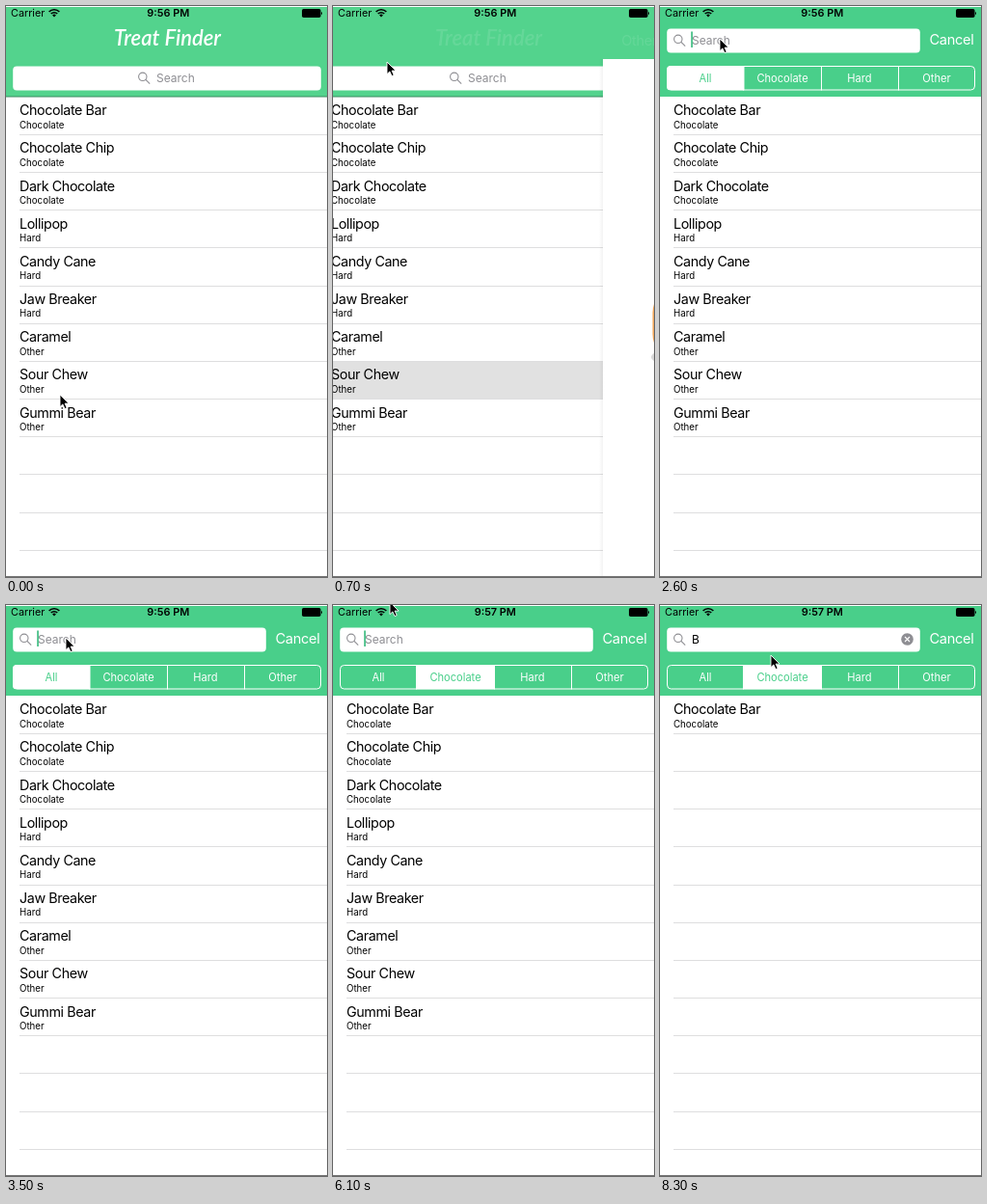
These frames come from a looping animation (333x592 px, 8.4 s). An HTML page:

```html
<!DOCTYPE html>
<html lang="en">
<head>
<meta charset="utf-8">
<title>Treat Finder</title>
<style>
html, body { margin: 0; width: 100%; height: 100%; overflow: hidden; background: #fff; }
svg { display: block; width: 333px; height: 592px; font-family: Inter, Roboto, sans-serif; }
.name { font-size: 14.3px; letter-spacing: -0.4px; }
.kind { font-size: 9.7px; }
.field { font-size: 12px; }
.scope { font-size: 11.1px; text-anchor: middle; }
.bar { font-size: 14.6px; letter-spacing: -0.3px; fill: #fff; }
.logo { font: italic 600 22px Lato, sans-serif; text-anchor: middle; fill: #fff; }
</style>
</head>
<body>
<svg viewBox="0 0 333 592">
  <defs>
    <linearGradient id="edge">
      <stop offset="0" stop-opacity="0"/>
      <stop offset="1" stop-opacity=".05"/>
    </linearGradient>
    <clipPath id="segClip"><rect x="7" y="62" width="320" height="25.5" rx="4"/></clipPath>
  </defs>
  <rect width="333" height="592" fill="#fff"/>
  <rect id="nav" width="333" height="56"/>
  <text id="home" class="logo" x="167.5" y="41">Treat Finder</text>
  <text id="kindTitle" class="bar" y="40.5" text-anchor="middle">Other</text>
  <g id="back">
    <path d="M15 28l-7 7.500 7 7.500" fill="none" stroke="#fff" stroke-width="2"/>
    <text class="bar" x="20" y="40.500">Back</text>
  </g>

  <g id="list">
    <rect y="94" width="333" height="498" fill="#fff"/>
    <rect id="glow" y="368" width="333" height="40" fill="#d9d9d9"/>
    <g id="lines" fill="#dededf"></g>
    <g id="rows"></g>
    <rect id="head" y="55" width="333" height="39"/>
    <rect id="rule" y="93.500" width="333" height="1" fill="#3c8a64"/>
    <g id="scopes"></g>
    <text id="cancel" class="bar" x="279.500" y="40.300">Cancel</text>
    <g id="search">
      <rect id="box" x="7.200" y="62.400" height="25.200" rx="4" fill="#fff"/>
      <g id="lens" fill="none" stroke="#8e8e93" stroke-width="1.100">
        <circle cx="4.800" cy="73.300" r="4.200"/>
        <path d="M7.900 76.400l4.300 4.300"/>
      </g>
      <text id="hint" class="field" y="79" fill="#8e8e93">Search</text>
      <text id="typed" class="field" x="33" y="79"></text>
      <rect id="caret" y="65.500" width="1.700" height="16.500" fill="#3fbd82"/>
      <g id="clear">
        <circle cx="256.500" cy="74.500" r="6.300" fill="#8e8e93"/>
        <path d="M254 72l5 5m0-5l-5 5" stroke="#fff" stroke-width="1.100"/>
      </g>
    </g>
  </g>

  <g id="detail">
    <rect x="-4" y="55" width="4" height="537" fill="url(#edge)"/>
    <rect y="55" width="333" height="537" fill="#fff"/>
    <text class="name" x="166.500" y="100" text-anchor="middle">Sour Chew</text>
    <ellipse cx="167" cy="364" rx="117" ry="18" fill="#d9d9d9"/>
    <rect x="177" y="284" width="100" height="80" rx="26" fill="#f3c63c"/>
    <rect x="51.500" y="290" width="112" height="78" rx="28" fill="#f6ab5e"/>
    <rect x="113" y="304" width="100" height="76" rx="26" fill="#f0b04a"/>
  </g>

  <rect width="333" height="1" fill="#fff"/>
  <rect y="591" width="333" height="1" fill="#777"/>
  <text x="5" y="11" font-size="10.800">Carrier</text>
  <path d="M44.600 6a7.400 7.400 0 0 1 10.800 0M46.700 8.100a4.600 4.600 0 0 1 6.600 0" fill="none" stroke="#000" stroke-width="1.500"/>
  <path d="M50 11.500l-1.900-2.100a2.700 2.700 0 0 1 3.800 0z"/>
  <text id="clock" x="168.300" y="11" font-size="10.900" font-weight="600" text-anchor="middle"></text>
  <rect x="307" y="3" width="19.500" height="9" rx="1.800"/>
  <path d="M327 5.700q2 1.800 0 3.600z"/>
  <path id="mouse" d="M0 0v12.600l2.900-2.700 2.100 4.700 2.200-1-2.100-4.500h4z" stroke="#fff" stroke-width=".9"/>
</svg>
<script>
const LOOP = 8400, STEP = 100, ROW = 39.17, TOP = 94.2;
const NS = "http://www.w3.org/2000/svg";
const $ = id => document.getElementById(id);
const set = (el, attrs) => { for (const k in attrs) el.setAttribute(k, attrs[k]); return el; };
const add = (parent, tag, attrs) => parent.appendChild(set(document.createElementNS(NS, tag), attrs));
const clamp = v => Math.min(1, Math.max(0, v));
const span = (t, from, to) => clamp((t - from) / (to - from));
const lerp = (a, b, u) => a + (b - a) * u;
const easeOut = u => 1 - (1 - u) ** 2;
const smooth = u => u * u * (3 - 2 * u);
const at = (keys, t) => keys.filter(k => k[0] <= t).pop()[1];

const candies = [
  ["Chocolate Bar", "Chocolate"], ["Chocolate Chip", "Chocolate"], ["Dark Chocolate", "Chocolate"],
  ["Lollipop", "Hard"], ["Candy Cane", "Hard"], ["Jaw Breaker", "Hard"],
  ["Caramel", "Other"], ["Sour Chew", "Other"], ["Gummi Bear", "Other"]
];
const kinds = ["All", "Chocolate", "Hard", "Other"];

const typing = [
  [0, ""], [2200, "C"], [2500, ""],
  [2800, "C"], [2900, "Ch"], [3000, "Cho"], [3100, "Choc"],
  [3200, "Cho"], [3300, "Ch"], [3400, "C"], [3500, ""],
  [4000, "H"], [4100, "Ha"], [4200, ""],
  [4600, "B"], [4700, "Ba"], [4800, "Bar"], [4900, "Ba"], [5000, "B"], [5100, ""],
  [6400, "D"], [6500, "Da"], [6600, "Dar"], [6700, "Dark"],
  [6900, "Dar"], [7000, "Da"], [7100, "D"], [7200, ""],
  [7400, "H"], [7600, ""], [7900, "B"]
];
const scopeAt = [[0, 0], [5500, 3], [5700, 2], [5900, 1]];
const caretAt = [[0, 0], [2000, 1], [3800, 0], [4000, 1], [8200, 0.5], [8300, 0]];
const path = [
  [0, 56, 403], [100, 56, 403], [400, 34, 70], [500, 30, 38], [600, 38, 44], [700, 56, 58],
  [900, 64, 174], [1100, 62, 76], [1300, 62, 74], [1700, 62, 34], [5200, 62, 34],
  [5400, 287, 76], [5500, 287, 76], [5700, 207, 76], [5900, 127, 76], [6100, 59, -3],
  [6400, 115, 52], [LOOP, 115, 52]
];

for (let i = 1; i <= 12; i++)
  add($("lines"), "rect", { x: 14, y: Math.floor(TOP + ROW * i), width: 319, height: 1 });

const rows = candies.map((_, i) => {
  const y = TOP + ROW * i;
  return [add($("rows"), "text", { class: "name", x: 14, y: y + 19 }),
          add($("rows"), "text", { class: "kind", x: 14, y: y + 32.4 })];
});

const chosen = add($("scopes"), "rect", { y: 62, width: 81, height: 25.5, fill: "#fff", "clip-path": "url(#segClip)" });
add($("scopes"), "path", { d: "M86.500 62v25.500M167.500 62v25.500M247.500 62v25.500", stroke: "#fff" });
add($("scopes"), "rect", { x: 7.5, y: 62.5, width: 319, height: 24.5, rx: 4, fill: "none", stroke: "#fff" });
const labels = kinds.map((k, i) => {
  const el = add($("scopes"), "text", { class: "scope", x: 47 + 80 * i, y: 78.5 });
  el.textContent = k;
  return el;
});

function moveMouse(t) {
  const i = path.findIndex(p => p[0] > t);
  const a = path[i - 1], b = path[i], u = span(t, a[0], b[0]);
  set($("mouse"), { transform: `translate(${lerp(a[1], b[1], u)} ${lerp(a[2], b[2], u)})` });
}

function showPage(t, act) {
  const d = t < 520 ? easeOut(span(t, 150, 450)) : 1 - easeOut(span(t, 520, 820));
  set($("list"), { transform: `translate(${Math.round(-100 * d)} 0)` });
  set($("detail"), { transform: `translate(${Math.round(333 * (1 - d))} 0)`, visibility: d ? "visible" : "hidden" });
  set($("home"), { transform: `translate(${-38 * d} ${-20 * act})`, opacity: clamp(1 - 5.6 * d) * clamp(1 - 2 * act) });
  set($("kindTitle"), { x: 166.5 + 180 * (1 - d), opacity: d ** 1.3 });
  set($("back"), { opacity: clamp(4 * d - 3) });
  set($("glow"), { opacity: t < 100 ? 0 : 1 - span(t, 640, 900) });
}

function showSearch(t, act) {
  const text = at(typing, t), scope = at(scopeAt, t);
  const green = `rgb(${[[83, 73], [211, 207], [141, 138]].map(c => Math.round(lerp(c[0], c[1], act)))})`;
  for (const id of ["nav", "head"]) set($(id), { fill: green });
  set($("rule"), { opacity: 1 - act });
  set($("search"), { transform: `translate(0 ${-39 * act})` });
  set($("box"), { width: lerp(319.6, 262.6, act) });
  set($("lens"), { transform: `translate(${lerp(137, 14, act)} 0)` });
  set($("hint"), { x: lerp(156, 33, act), opacity: text ? 0 : 1 });
  $("typed").textContent = text;
  const width = text ? $("typed").getComputedTextLength() : 0;
  set($("caret"), { x: 32.2 + width, opacity: at(caretAt, t) });
  set($("clear"), { opacity: text ? 1 : 0 });
  set($("cancel"), { opacity: act });
  set($("scopes"), { opacity: clamp(2 * act - 1) });
  set(chosen, { x: 6.5 + 80 * scope });
  labels.forEach((el, i) => set(el, { fill: i === scope ? green : "#fff" }));

  const found = candies.filter(([name, kind]) => !text ||
    (!scope || kind === kinds[scope]) && name.toLowerCase().includes(text.toLowerCase()));
  rows.forEach((pair, i) => pair.forEach((el, j) => { el.textContent = found[i] ? found[i][j] : ""; }));
}

function draw(ms) {
  const t = Math.floor(ms % LOOP / STEP) * STEP;
  const act = smooth(span(t, 1200, 1600));
  showPage(t, act);
  showSearch(t, act);
  moveMouse(t);
  $("clock").textContent = t < 5200 ? "9:56 PM" : "9:57 PM";
}

let start;
function tick(now) {
  start ??= now;
  draw(now - start);
  requestAnimationFrame(tick);
}
draw(0);
requestAnimationFrame(tick);
</script>
</body>
</html>
```
